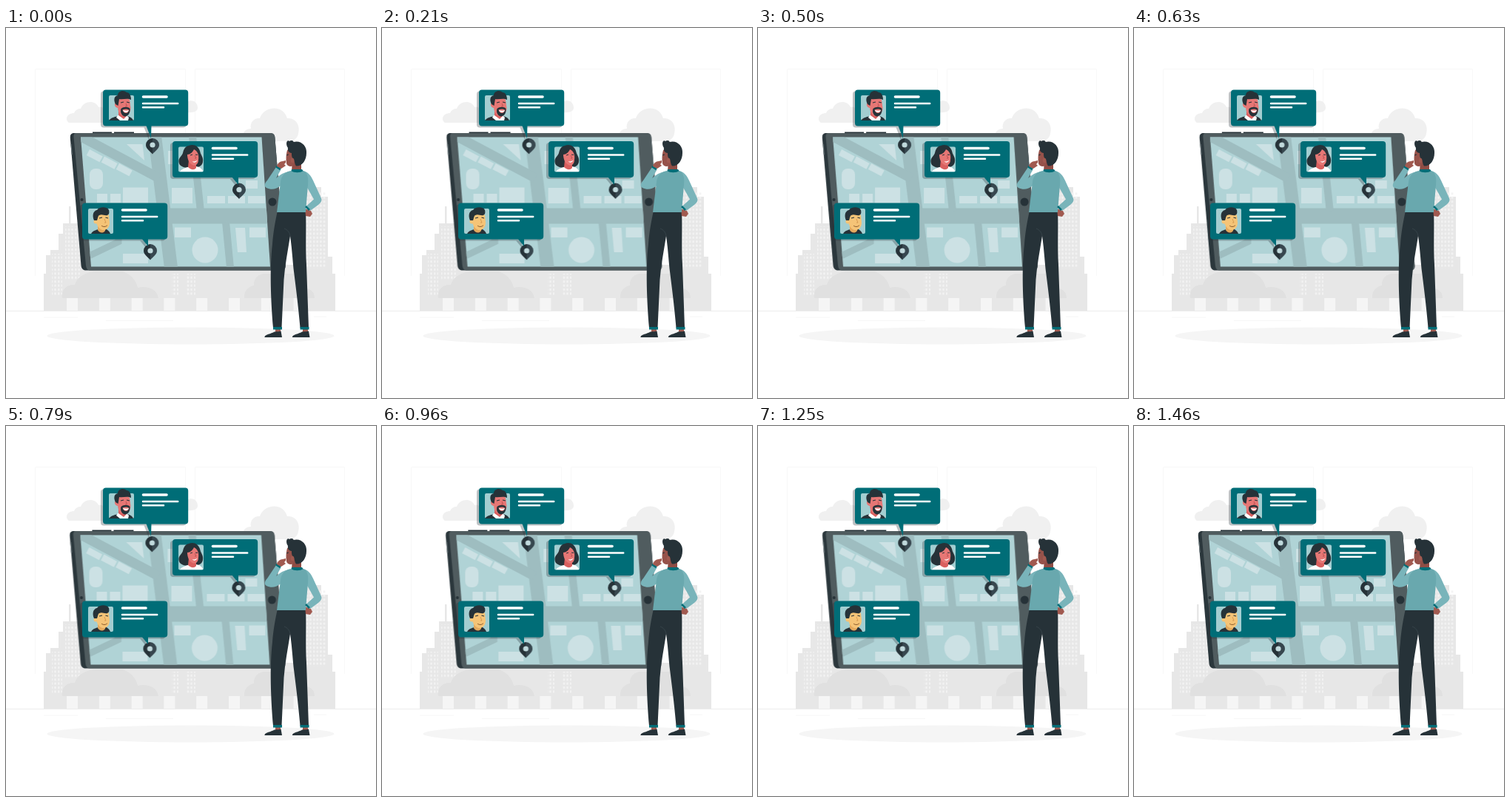
An HTML page for the animation above (1500 ms loop, 500 by 500 pixels).

```html
<!DOCTYPE html>
<html lang="en">
<head>
<meta charset="utf-8">
<title>Map with contacts</title>
<style>
  html, body { margin: 0; width: 100%; height: 100%; overflow: hidden; background: #fff; }
  svg { display: block; width: 100vw; height: 100vh; }
  .raised { filter: drop-shadow(-2.5px 2px 0 rgba(38, 50, 56, .3)); }
</style>
</head>
<body>
<svg viewBox="0 0 500 500">
  <defs>
    <pattern id="windows" width="4.6" height="5.4" patternUnits="userSpaceOnUse">
      <rect x="1" y="1" width="2.4" height="3" fill="#f3f3f3"/>
    </pattern>
    <clipPath id="screen"><path d="M101 147.500H345.500L357 322.500H115Z"/></clipPath>
    <g id="pin">
      <path d="M0 -9.500A9 9 0 0 0 -9 -.5C-9 5 -3 8 0 12Z" fill="#263238"/>
      <path d="M0 -9.500A9 9 0 0 1 9 -.5C9 5 3 8 0 12Z" fill="#37474f"/>
      <circle cy="-.5" r="3.600" fill="#c0d9dc"/>
    </g>
    <g id="card">
      <rect width="115.200" height="49" rx="4" fill="#006d77"/>
      <rect x="8" y="7.500" width="34" height="34" rx="2" fill="#a3ced1"/>
      <path d="M54.500 9.500H86" stroke="#fff" stroke-width="3.600" stroke-linecap="round"/>
      <path d="M54 18.500H101.200M54 23.800H82" stroke="#fff" stroke-width="2.500" stroke-linecap="round"/>
    </g>
  </defs>

  <g id="backdrop">
    <path d="M39.500 335V55.500H242.500V335M255.500 335V55.500H457.500V335" fill="none" stroke="#f8f8f8"/>
    <g fill="#f0f0f0">
      <path d="M85 128C79 124 82 115 92 115C94 110 98 109 101 109C105 98 121 97 125 107C130 106 134 109 136 113V128Z"/>
      <path d="M244 100C253 95 259 101 259 108C259 112 254 115 244 114Z"/>
      <path d="M324 153C316 147 321 136 331 136C329 127 336 121 343 122C348 106 374 102 380 122C393 121 399 134 394 146C391 152 386 153 380 153Z"/>
    </g>
    <path id="skyline" fill="#e7e7e7" d="M51 382V332H54V307H60V300H71V278H77V264H85V241H87.500V264H105V320H400V215H426V228H435V309H441V332H445V382Z"/>
    <path fill="url(#windows)" d="M62 305H76V362H62ZM80 268H100V340H80ZM405 222H433V325H405ZM224 332H233V362H224ZM243 332H256V362H243Z"/>
    <g fill="#e0e0e0">
      <path d="M76 365C74 352 84 346 93 347C97 334 111 329 124 329H158C169 333 176 341 178 351C190 348 204 352 206 365Z"/>
      <path d="M322 365C321 355 328 349 335 348C334 338 342 331 352 332H388C399 335 406 344 406 352C413 353 417 358 417 365Z"/>
    </g>
    <path fill="#e7e7e7" d="M51 365H445V382H51Z"/>
    <path d="M0 382.500H500" stroke="#ececec"/>
    <path d="M51 391H97M135 395.500H226M416 390H433" stroke="#f6f6f6"/>
    <ellipse cx="249.500" cy="416" rx="194" ry="11.500" fill="#f5f5f5"/>
  </g>

  <g id="tablet">
    <path d="M117 143V140.500H143V143ZM146 143V140.500H173V143Z" fill="#263238"/>
    <path d="M92 142H357C361 142 363 144 363.400 148L377.500 321C377.800 325 376 327.500 372 327.500H108C104 327.500 102 325 101.500 321L86.800 149C86.500 144 88 142 92 142Z" fill="#2b373c"/>
    <path d="M95 142H357C361 142 363 144 363.400 148L377.500 321C377.800 325 376 327.500 372 327.500H114C110 327.500 108.500 325 108 321L91.500 148C91.200 144 92 142 95 142Z" fill="#505c5f"/>
    <path d="M88 157L89.200 171" stroke="#657175" stroke-width="1.200"/>
    <circle cx="102.500" cy="232" r="2" fill="#263238"/>
    <circle cx="360" cy="235" r="5.500" fill="#263238"/>
    <g clip-path="url(#screen)">
      <path d="M95 142H370V330H95Z" fill="#b0d3d6"/>
      <g fill="none" stroke="#9ebdc0">
        <path d="M201 146L223 324" stroke-width="18"/>
        <path d="M98 145L207 203" stroke-width="13"/>
        <path d="M212 254H362" stroke-width="21"/>
        <path d="M100 242H215" stroke-width="11"/>
        <path d="M252 146L263 248M297 262L303 324" stroke-width="10"/>
        <path d="M108 310L152 289V278" stroke-width="9"/>
      </g>
      <g id="blocks" fill="#cce1e4">
        <path d="M163 157H184.500L187 179Z"/>
        <rect x="113" y="190" width="18" height="28" rx="8"/>
        <circle cx="269" cy="300" r="17.500"/>
        <path d="M310 270H323L325 303H313Z"/>
      </g>
    </g>
    <use href="#pin" x="198" y="158.500"/>
    <use href="#pin" x="315" y="219"/>
    <use href="#pin" x="195" y="301.500"/>
  </g>

  <g class="raised" fill="#006d77">
    <path d="M189 131H196.500L196 149Z"/>
    <use href="#card" x="131" y="83.500"/>
  </g>
  <g class="raised" fill="#006d77">
    <path d="M305 201H314V212Z"/>
    <use href="#card" x="225" y="153"/>
  </g>
  <g class="raised" fill="#006d77">
    <path d="M183 284H192V295Z"/>
    <use href="#card" x="103" y="236.500"/>
  </g>

  <g id="beardedMan">
    <path d="M139 125C142 121 147 120 152 119H164C168 120 171 122 172 125Z" fill="#263238"/>
    <path d="M151 118L149 121L154 125H165L166 121L162 117Z" fill="#fff"/>
    <path d="M152 108H163V119L159 123L152 118Z" fill="#d9605f"/>
    <path d="M151 97C155 93 164 93 167 97L168.500 108C168 116 163 120 158 119C153 117 151 112 151 106Z" fill="#e67775"/>
    <path d="M151 108C145 107 146 99 151 101Z" fill="#e67775"/>
    <path d="M148 103C145 97 146 92 151 91C151 85 159 83 163 87C167 87 169 92 169 97C164 94 158 97 153 96L151.500 105Z" fill="#263238"/>
    <path d="M155.500 109C159 106 165 106 167.500 109C168 116 164 120 160 119.500C156 118 154 114 155.500 109Z" fill="#263238"/>
    <path d="M157.500 110.500C160 109 164 109 166 110.500C166 116 159 117 157.500 110.500Z" fill="#e67775"/>
    <path d="M158 111C161 112 164 112 166 111C165 115 159 115 158 111Z" fill="#fff"/>
    <path d="M155 101L159 100M163 100L167 101" stroke="#263238" stroke-width="1.100"/>
    <path d="M162 102L163.500 106H161" fill="none" stroke="#b84a4c" stroke-width=".8"/>
  </g>

  <g id="woman">
    <path d="M247 159C254 156 260 160 262 166C263 172 267 174 266 181C265 187 259 189 254 188C246 190 234 189 233.500 181C233 175 237 174 239 169C240 164 242 160 247 159Z" fill="#263238"/>
    <path d="M235 194C238 190 245 188 249 187H257C262 188 265 190 266 194Z" fill="#fff"/>
    <path d="M247 178H257V189C254 193 249 191 246 188Z" fill="#d9605f"/>
    <path d="M245 171C249 171 252 168 254 164C259 166 261 172 260 178C260 184 256 187 252 185C248 183 245 178 245 171Z" fill="#e67775"/>
    <path d="M252 180C254 181 257 180 258.500 178.500C258 181.500 253 183 252 180Z" fill="#fff"/>
    <path d="M249 172L252 171M256 171L259 171.500" stroke="#263238"/>
    <path d="M255 172L257 176H255" fill="none" stroke="#b84a4c" stroke-width=".8"/>
  </g>

  <g id="youngMan">
    <path d="M115 278C118 273 123 273 127 271H134C138 273 140 275 141 278Z" fill="#263238"/>
    <path d="M124 265H134V274C131 278 126 277 124 273Z" fill="#e3a95e"/>
    <path d="M122 253C126 249 136 249 139 253L140 263C140 270 135 274 130 273C125 271 122 266 122 260Z" fill="#f5c477"/>
    <circle cx="121.500" cy="261.500" r="3" fill="#f5c477"/>
    <path d="M119 260C116 253 118 247 123 246C126 241 137 241 139 246C140 250 139 252 137 253C133 254 130 251 126 253C124 254 124 258 123 260Z" fill="#263238"/>
    <path d="M126 257L130 256M134.500 256L138 257" stroke="#263238" stroke-width="1.100"/>
    <path d="M129 267C131 269 135 269 137 266.500" fill="none" stroke="#8a5a2b"/>
    <path d="M133 258L135 263H133" fill="none" stroke="#cf914b" stroke-width=".8"/>
  </g>

  <g id="viewer">
    <path d="M364 404H371V411H364ZM401 404H408V411H401Z" fill="#a15a50"/>
    <path id="shoe" d="M349.500 418C349 415 355 414 361 411.500C363 409.500 366 411 371.500 409.500L373 418Z" fill="#263238"/>
    <use href="#shoe" x="37.500"/>
    <path d="M367 247H405C406 270 404.500 295 406 320L409 405H397.500C395 375 391 345 388.500 325C387 308 386 295 384 281C381 300 377 320 375.500 340L372.500 405H361C358 370 356 325 360 292C361 277 364 260 367 247Z" fill="#263238"/>
    <path d="M384 281C383 276 381 273 376 271" fill="none" stroke="#3a484f" stroke-width=".8"/>
    <path d="M361 404H373V407.500H361ZM397.500 404H409.500V407.500H397.500Z" fill="#006d77"/>
    <path d="M404 244L412 247L414 251L411 255L405 254Z" fill="#a15a50"/>
    <path d="M387 179H399V195C395 198 390 198 386 194Z" fill="#8f4d45"/>
    <path d="M380 165C378.500 171 378 177 379 183C380 187 385 188 388 186L394 175L389 163Z" fill="#96524a"/>
    <path d="M381 162C377 156 380 150 383 153C385 151 389 152 388.500 154C399 151 407 160 406 169C406 179 400 187 392 186.500C390 184 390 180 389 177C386 176 386 172 386 169C383 169 380 166 381 162Z" fill="#263238"/>
    <ellipse cx="387" cy="179" rx="2.200" ry="3.200" fill="#a15a50"/>
    <path d="M379 172L382 171" stroke="#263238"/>
    <g fill="#79b4ba">
      <path d="M382 194C376 195 370 198 365 203L371.500 191.500L365 188L353 206C350 209 348 214 352 216C358 219 365 218 370 214L378 208Z"/>
      <path d="M400 193C409 194 412 200 415 206L426 230C427.500 234 425 236 422 239L411 247L405.500 241L416 231.500L405 212Z"/>
    </g>
    <path d="M385 193H402C407 195 409 202 408 212L405 249H366L371 208C372 199 378 194 385 193Z" fill="#69a8ae"/>
    <path d="M385.500 193C389 196 398 196 401.500 193L400 191H386Z" fill="#006d77"/>
    <path d="M365 187L371 191" stroke="#006d77" stroke-width="3"/>
    <path d="M405 241L410 246" stroke="#006d77" stroke-width="2.500"/>
    <path d="M366 187C367 183 370 180 374 180L378 179V182L376 184L378 186L372 190Z" fill="#a15a50"/>
  </g>
</svg>
<script>
  const $ = id => document.getElementById(id);

  function addRect(parent, x, y, width, height, fill, turn = 0) {
    const r = document.createElementNS('http://www.w3.org/2000/svg', 'rect');
    const attrs = { x, y, width, height, transform: `rotate(${turn} ${x} ${y})` };
    if (fill) attrs.fill = fill;
    for (const k in attrs) r.setAttribute(k, attrs[k]);
    parent.append(r);
  }

  // Pale gaps in the low wall
  for (let i = 0; i < 8; i++) addRect($('backdrop'), 82 + i * 43.8, 365, 15, 17, '#f5f5f5');

  // City blocks on the map
  for (let i = 0; i < 3; i++) addRect($('blocks'), 113 + i * 20, 164 + i * 9.5, 20, 9, null, 28);
  [
    [123, 224, 14, 12], [141, 224, 14, 12], [158, 215.5, 34, 21],
    [158, 305, 34, 13], [224, 216, 28, 21], [219, 166, 24, 18],
    [272, 227, 24, 10], [300, 227, 23, 10], [327, 227, 23, 10],
    [324, 206, 16, 11], [228, 269.5, 22, 13.5], [329, 269.5, 22, 13.5]
  ].forEach(([x, y, w, h]) => addRect($('blocks'), x, y, w, h));

  // Sideways shake, played at 24 pictures per second
  const LOOP = 1500, TICK = LOOP / 36, SCALE = 0.6;
  const shake = $('tablet').animate(
    [0, -1, 2, -4, 4, -4, 4, -4, 2, -1, 0].map(x => ({
      transform: `translateX(${x * SCALE}px)`,
      easing: 'cubic-bezier(.36, .07, .19, .97)'
    })),
    { duration: LOOP, iterations: Infinity }
  );
  shake.pause();

  const start = performance.now();
  function draw(now) {
    const t = Math.max(0, now - start) % LOOP;
    shake.currentTime = Math.floor((t + 5) / TICK) * TICK % LOOP;
    requestAnimationFrame(draw);
  }
  draw(start);
</script>
</body>
</html>
```
